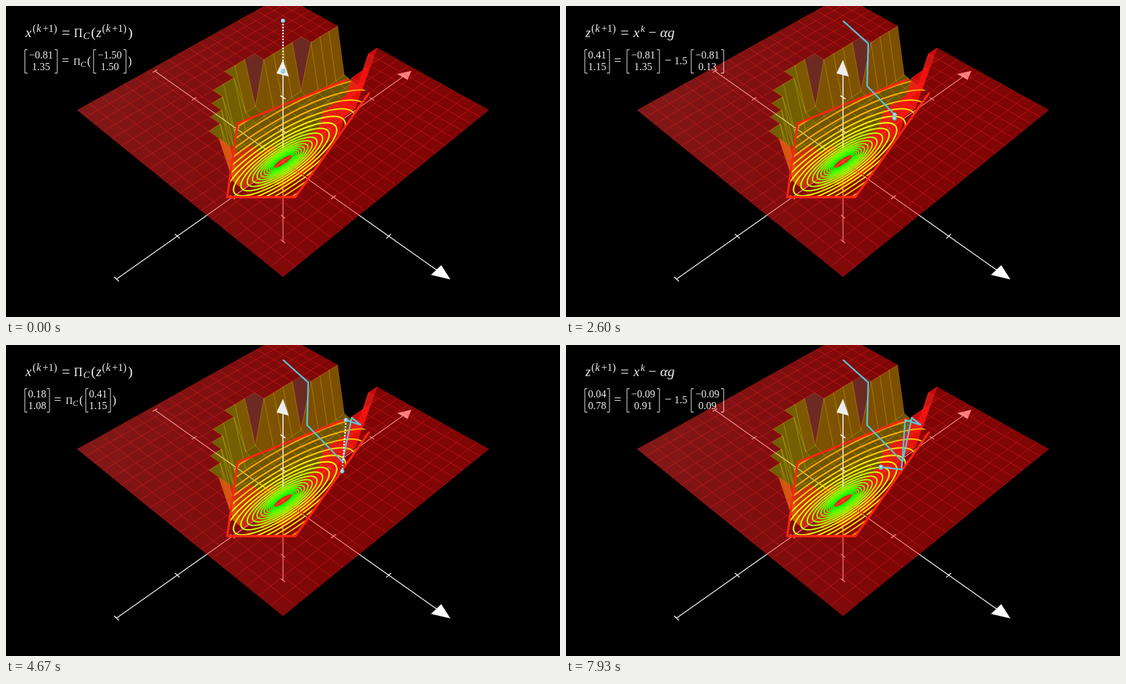
An HTML page with a canvas that plays this animation: 854x480 px, repeating every 8000 ms.

```html
<!DOCTYPE html>
<html>
<head>
<meta charset="utf-8">
<style>
  html, body { margin: 0; width: 100%; height: 100%; overflow: hidden; background: #000; }
  canvas { display: block; }
</style>
</head>
<body>
<canvas id="stage" width="854" height="480"></canvas>
<script>
const LOOP = 8000, H = Math.SQRT1_2;
const stage = document.getElementById('stage').getContext('2d');
const backdrop = document.createElement('canvas');
backdrop.width = 854;
backdrop.height = 480;
let c = backdrop.getContext('2d');

// Perspective view from azimuth -45 degrees, tilt 45 degrees.
function project([x, y, z = 0]) {
  const k = 105.2 / (1 - (0.5 * (x - y) + H * z) / 11.5);
  return [427 + (x + y) * H * k, 240 - H * ((y - x) * H + z) * k];
}

function trace(points, close) {
  c.beginPath();
  points.forEach(([x, y]) => c.lineTo(x, y));
  if (close) c.closePath();
}

function line(points, color, width) {
  trace(points);
  c.strokeStyle = color;
  c.lineWidth = width;
  c.stroke();
}

function fill(points, color) {
  trace(points, true);
  c.fillStyle = color;
  c.fill();
}

// Feasible set and the surface above it, cut off at height 1.
const upperSide = (x, y) => x + 1.084 - 0.239 * (y - 0.0945);
const lowerSide = (x, y) => y - 0.0945 + 1.113 * (x + 1.084);
const rightSide = (x, y) => 0.5073 - x - 0.3034 * y;
const inside = (x, y) => upperSide(x, y) >= 0 && lowerSide(x, y) >= 0 &&
  rightSide(x, y) >= 0 && x - y < 0.999;
const bowl = (x, y) => 0.2 * x * x + 0.02 * y * y;

function quadStyle(x, y, tops) {
  if (tops === 4) {
    const light = Math.round(10 + 8 * Math.max(0, -x - y + 1));
    return [`rgba(255,${light},${light},.5)`, 'rgba(255,35,35,.32)'];
  }
  if (tops === 0) return ['rgba(215,170,5,.5)', 'rgba(235,200,20,.28)'];
  if (x - y > 0.7 && x > 0) return ['rgba(255,30,10,.2)', 'rgba(255,40,20,.2)'];
  if (x + 0.3034 * y > 0.3) return ['rgba(255,25,20,.55)', 'rgba(255,45,30,.3)'];
  if (y > 0.1) {
    return tops === 3 ? ['rgba(215,85,70,.5)', 'rgba(230,110,60,.3)']
                      : [`rgba(250,${Math.round(125 - 45 * x)},5,.5)`, 'rgba(235,180,20,.3)'];
  }
  return ['rgba(225,190,5,.5)', 'rgba(225,200,30,.3)'];
}

function drawMesh() {
  // Far diagonals first.
  for (let s = -19; s <= 19; s++) {
    for (let i = 0; i < 20; i++) {
      const j = i - s;
      if (j < 0 || j > 19) continue;
      let tops = 0;
      const corners = [[0, 0], [1, 0], [1, 1], [0, 1]].map(([a, b]) => {
        const x = (i + a - 10) / 5, y = (j + b - 10) / 5;
        const low = inside(x, y);
        if (!low) tops++;
        return project([x, y, low ? bowl(x, y) : 1]);
      });
      const [color, edge] = quadStyle((i - 9.5) / 5, (j - 9.5) / 5, tops);
      fill(corners, color);
      line([...corners, corners[0]], edge, 0.9);
    }
  }
}

const zUnit = 0.615;
function zAxis(from, to) {
  line([project([0, 0, from * zUnit]), project([0, 0, to * zUnit])], '#eee', 1.3);
  for (let n = Math.ceil(from); n < to; n++) {
    const z = n * zUnit;
    if (n) line([project([-0.05, 0, z]), project([0.05, 0, z])], '#eee', 1.3);
  }
}

function drawAxes() {
  line([project([-3, 0]), project([2.9, 0])], '#fff', 1.3);
  line([project([0, -3]), project([0, 2.9])], '#fff', 1.3);
  for (const n of [-3, -2, -1, 1, 2]) {
    line([project([n, -0.05]), project([n, 0.05])], '#fff', 1.3);
    line([project([-0.05, n]), project([0.05, n])], '#fff', 1.3);
  }
  fill([[685, 422], [655, 415], [671, 400]], '#fff');
  fill([[625, 100], [603, 105], [619, 114]], '#fff');
  zAxis(-3, 3);
}

function ellipse(r) {
  const points = [];
  for (let a = 0; a < 6.29; a += 0.03) {
    const x = r * Math.cos(a), y = r * Math.sqrt(10) * Math.sin(a);
    points.push(project([x, y, bowl(x, y)]));
  }
  return points;
}

function drawContours() {
  const outline = [[527, 113], [357, 181], [341, 295], [446, 295], [560, 134]];
  c.save();
  trace(outline, true);
  c.clip();
  fill(ellipse(0.07), 'rgba(255,35,20,.4)');
  for (let i = 0; i < 19; i++) {
    const hue = Math.max(38, 122 - 5.5 * i);
    line(ellipse(0.062 * 1.17 ** i), `hsl(${hue},98%,50%)`, 2.2);
  }
  c.restore();
  c.lineJoin = 'round';
  line(outline, '#ff2410', 3.3);
}

drawAxes();
drawMesh();
drawContours();
zAxis(0.45, 3);
fill([[427, 83], [417, 104], [436, 109]], '#eee');

// Trail corners: progress, then x, y, z.
const trail = [
  [0, -1.5, 1.5, 1], [0.994, -0.81, 1.35, 1], [1, -0.81, 1.35, 0.17],
  [1.735, 0.087, 1.203, 0.05], [1.84, 0.215, 1.182, 1], [2, 0.41, 1.15, 1],
  [2.994, 0.18, 1.08, 1], [3, 0.18, 1.08, 0.03], [4, -0.09, 0.91, 0.02]
];
const moves = [[0, 2000], [2070, 1000], [3130, 2000], [5130, 1000]];

function smooth(t) {
  const sigmoid = v => 1 / (1 + Math.exp(-v)), edge = sigmoid(-5);
  t = Math.min(1, Math.max(0, t));
  return (sigmoid(10 * (t - 0.5)) - edge) / (1 - 2 * edge);
}

function ball([x, y]) {
  const shade = c.createRadialGradient(x - 1, y - 1, 0, x, y, 3.6);
  shade.addColorStop(0, '#d8f6ff');
  shade.addColorStop(1, '#4fb4cd');
  c.fillStyle = shade;
  c.beginPath();
  c.arc(x, y, 3.3, 0, 7);
  c.fill();
}

function drawTrail(time) {
  const progress = moves.reduce((sum, [start, span]) => sum + smooth((time - start) / span), 0);
  const n = Math.max(1, trail.findIndex(p => p[0] >= progress - 1e-9));
  const [a, b] = [trail[n - 1], trail[n]];
  const f = (progress - a[0]) / (b[0] - a[0]);
  const spot = [1, 2, 3].map(i => a[i] + (b[i] - a[i]) * f);
  const top = project(spot), foot = project([spot[0], spot[1], 0]);
  c.lineJoin = 'round';
  line([...trail.slice(0, n).map(p => project(p.slice(1))), top], '#58c4dd', 2.4);
  c.setLineDash([2.4, 2.2]);
  line([top, foot], '#fff', 2.4);
  c.setLineDash([]);
  ball(foot);
  ball(top);
}

function text(str, x, y, size, style = '') {
  c.font = `${style} ${size}px "Liberation Serif", "Noto Serif", serif`;
  c.fillText(str, x, y);
}

function nextIndex(x) {
  text('(', x, 40, 16);
  text('k', x + 6, 40, 16, 'italic');
  text('+1)', x + 15.5, 40, 16);
}

// Draws a two-row column vector and returns its right side.
function vector(rows, x) {
  const width = rows.some(r => r[0] === '−') ? 50 : 38;
  for (const [side, lip] of [[x, 4], [x + width, -4]]) {
    line([[side + lip, 67.5], [side, 67.5], [side, 103.5], [side + lip, 103.5]], '#eee', 1);
  }
  c.textAlign = 'center';
  rows.forEach((r, i) => text(r, x + width / 2, 80.5 + 18.5 * i, 16));
  c.textAlign = 'left';
  return x + width;
}

function projection(result, point) {
  text('x', 30, 48, 21, 'italic');
  nextIndex(41);
  text('=', 86, 49, 23);
  text('Π', 104.5, 48, 19);
  text('C', 119, 51, 15, 'italic');
  text('(', 131, 48, 22);
  text('z', 139, 48, 21, 'italic');
  nextIndex(148);
  text(')', 188, 48, 22);
  const x = vector(result, 29);
  text('=', x + 7, 91, 20);
  text('Π', x + 25, 91, 15);
  text('C', x + 36, 94, 12, 'italic');
  text('(', x + 46, 91, 18);
  text(')', vector(point, x + 56) + 3, 91, 18);
}

function gradientStep(result, point, slope) {
  text('z', 30, 48, 21, 'italic');
  nextIndex(39);
  text('=', 84, 49, 23);
  text('x', 104, 48, 21, 'italic');
  text('k', 115, 40, 15, 'italic');
  text('−', 127, 48, 22);
  text('αg', 145, 48, 22, 'italic');
  let x = vector(result, 29);
  text('=', x + 7, 91, 20);
  x = vector(point, x + 27);
  text('−', x + 8, 90, 19);
  text('1.5', x + 23, 90, 16);
  vector(slope, x + 49);
}

const p1 = ['−0.81', '1.35'], z1 = ['0.41', '1.15'], p2 = ['0.18', '1.08'], z2 = ['−0.09', '0.91'];
const captions = [
  [7630, () => gradientStep(['0.04', '0.78'], z2, ['−0.09', '0.09'])],
  [6130, () => projection(z2, z2)],
  [5100, () => gradientStep(z2, p2, ['0.18', '0.11'])],
  [3100, () => projection(p2, z1)],
  [2040, () => gradientStep(z1, p1, ['−0.81', '0.13'])],
  [0, () => projection(p1, ['−1.50', '1.50'])]
];

function frame(now) {
  const time = now % LOOP;
  c = stage;
  c.fillStyle = '#000';
  c.fillRect(0, 0, 854, 480);
  c.drawImage(backdrop, 0, 0);
  drawTrail(time);
  c.fillStyle = '#eee';
  captions.find(([start]) => time >= start)[1]();
  requestAnimationFrame(frame);
}
requestAnimationFrame(frame);
</script>
</body>
</html>
```
